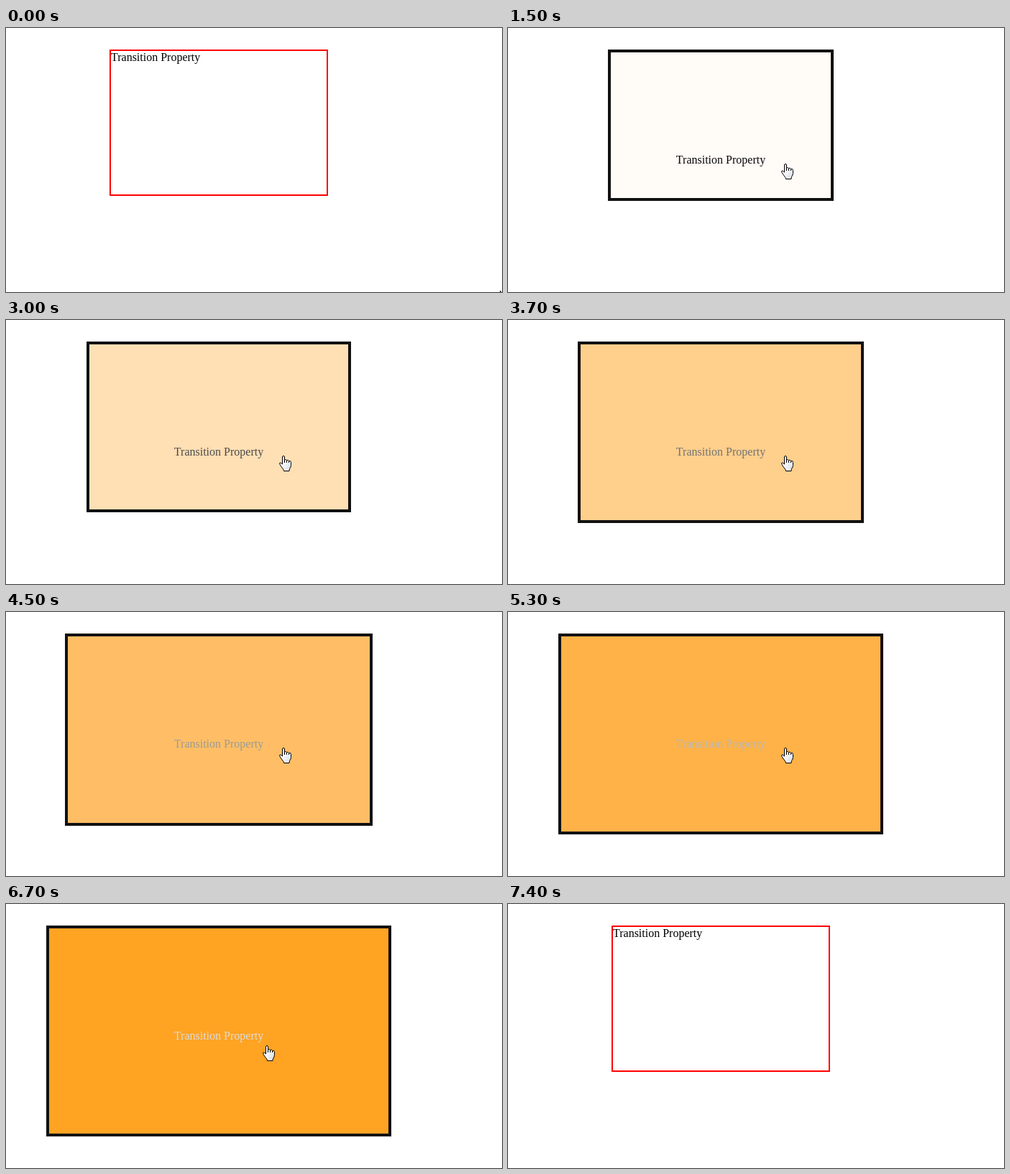
Write an HTML page that moves like this. It is 690 px wide and 368 px high and loops after 8.1 s.

```html
<!DOCTYPE html>
<html lang="en">
<head>
<meta charset="utf-8">
<title>Transition Property</title>
<style>
  html, body { margin: 0; width: 100%; height: 100%; overflow: hidden; background: #fff; }
  svg { display: block; width: 690px; height: 368px; }
  text { font: 16px "Liberation Serif", "Times New Roman", Times, serif; }
  .cursor path { stroke: #000; stroke-width: 1; stroke-linejoin: round; }
</style>
</head>
<body>
<svg viewBox="0 0 690 368">
  <defs>
    <linearGradient id="shade" x1="0.3" y1="0.4" x2="1" y2="1">
      <stop offset="0" stop-color="#fff"/>
      <stop offset="1" stop-color="#d4d8e0"/>
    </linearGradient>
  </defs>
  <rect id="border" y="30" shape-rendering="crispEdges"/>
  <rect id="fill" shape-rendering="crispEdges"/>
  <text id="label">Transition Property</text>
  <g id="arrow" class="cursor">
    <path fill="#fff" d="M.5 .5V16.5L4.3 12.8L6.8 18.5L9.2 17.5L6.8 11.8H11.5Z"/>
  </g>
  <g id="hand" class="cursor">
    <path fill="url(#shade)" d="M4.5 12V2Q4.5 .5 6 .5T7.5 2V6Q9.5 4.8 10.5 6.5Q12.7 5.5 13.5 7.5Q16.5 6.8 16.5 9.5V13.5Q16.5 16 14.5 18.5L14 21.5H6.5L6 19.5Q4 17 2 14Q.5 11.5 .5 10.5Q1.5 8.5 4.5 12Z"/>
    <path fill="none" d="M7.5 6V10M10.5 6.5V10M13.5 7.5V10"/>
  </g>
</svg>
<script>
const LOOP = 8100, STEP = 100;
const HOVER = 1000, LEAVE = 7400, DURATION = 10000;
const CENTER = 296, TOP = 30;
const FILL = [255, 148, 0];

const $ = id => document.getElementById(id);
const [border, fill, label, arrow, hand] =
  ["border", "fill", "label", "arrow", "hand"].map($);

const set = (el, attrs) => {
  for (const key in attrs) el.setAttribute(key, attrs[key]);
};
const clamp = x => Math.min(1, Math.max(0, x));
const mix = (a, b, p) => a + (b - a) * p;
const smooth = x => x * x * (3 - 2 * x);
const rgb = parts => `rgb(${parts.map(Math.round).join()})`;

// CSS "ease": cubic-bezier(.25, .1, .25, 1)
const bezier = (a, b, u) =>
  3 * a * u * (1 - u) ** 2 + 3 * b * u * u * (1 - u) + u ** 3;

function ease(x) {
  let lo = 0, hi = 1;
  for (let i = 0; i < 30; i++) {
    const mid = (lo + hi) / 2;
    if (bezier(.25, .25, mid) < x) lo = mid; else hi = mid;
  }
  return bezier(.1, 1, lo);
}

function pointer(t) {
  const x = clamp(t / 1340);
  const f = (x + smooth(x)) / 2;
  const drift = smooth(clamp((t - 5800) / 800));
  return [
    mix(687, 386, f) - 23 * drift,
    mix(366, 189, f) - 12 * f * (1 - f) + 8 * drift
  ].map(Math.round);
}

function drawBox(hovered, p) {
  const line = hovered ? 4 : 2;
  const w = mix(300, 500, p) + 2 * line;
  const h = mix(200, 300, p) + 2 * line;
  const left = Math.round(CENTER - w / 2);
  const width = Math.round(CENTER + w / 2) - left;
  const height = Math.round(TOP + h) - TOP;
  set(border, { x: left, width, height, fill: hovered ? "#111" : "#f00" });
  set(fill, {
    x: left + line, y: TOP + line,
    width: width - 2 * line, height: height - 2 * line,
    fill: rgb(FILL.map(c => mix(255, c, p)))
  });
  set(label, {
    x: hovered ? CENTER : left + line,
    y: hovered ? 189 : 46,
    "text-anchor": hovered ? "middle" : "start",
    fill: rgb([255, 255, 255].map(c => c * p))
  });
}

function draw(time) {
  const t = Math.floor(time % LOOP / STEP) * STEP;
  const hovered = t >= HOVER && t < LEAVE;
  drawBox(hovered, hovered ? ease((t - HOVER) / DURATION) : 0);

  const [x, y] = pointer(t);
  set(arrow, {
    transform: `translate(${x} ${y})`,
    visibility: t < HOVER ? "visible" : "hidden"
  });
  set(hand, {
    transform: `translate(${x - 6} ${y})`,
    visibility: hovered ? "visible" : "hidden"
  });
}

const start = performance.now();
function tick() {
  draw(performance.now() - start);
  requestAnimationFrame(tick);
}
tick();
</script>
</body>
</html>
```
